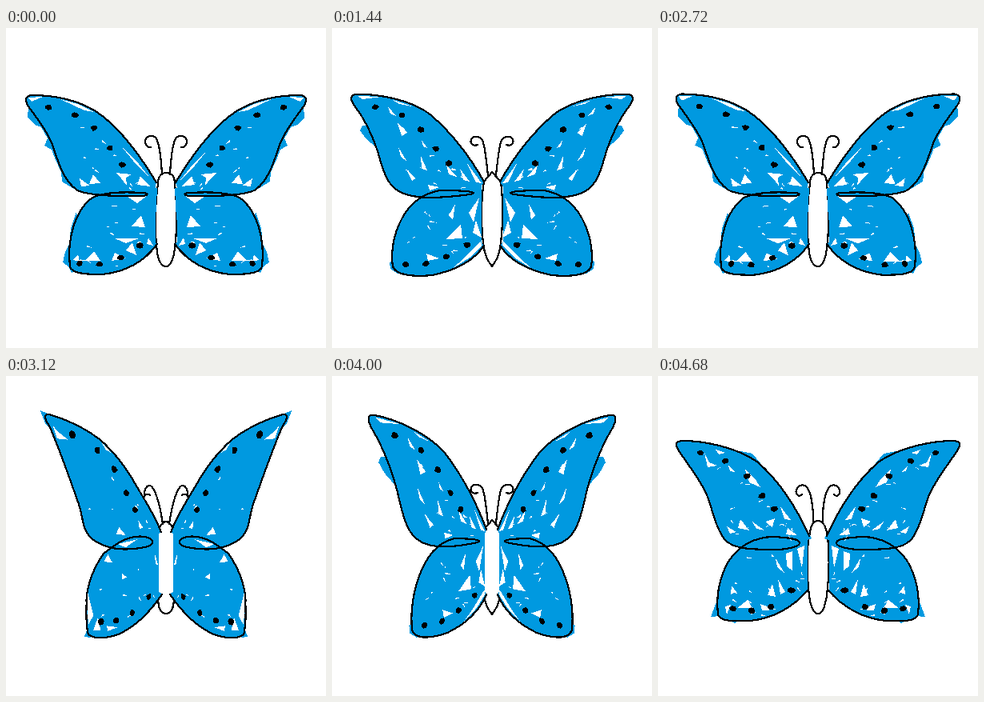
An HTML page for the animation above (4.8 s loop, 400 by 400 pixels).

```html
<!DOCTYPE html>
<html lang="en">
<head>
<meta charset="utf-8">
<title>Butterfly</title>
<style>
  html, body { margin: 0; width: 100%; height: 100%; overflow: hidden; background: #fff; }
  svg { display: block; width: 100vw; height: 100vh; }
  path { shape-rendering: crispEdges; fill: none; }
  .line { stroke: #000; stroke-width: 2.2; stroke-linecap: round; stroke-linejoin: round; }
  .ink { fill: #0099e0; }
  .gap { fill: #fff; }
  .spot { fill: #000; }
</style>
</head>
<body>
<svg id="stage" viewBox="0 0 400 400"></svg>
<script>
const LOOP = 4800, CAMERA = 555.56;

// Four hand drawn versions of the left half; the right half is its mirror.
// "over" is the colouring that runs past the outline.
const drawings = [
  {
    body: 'M190,195 C190,186 194,181 200,181 C207,181 211,186 211,195 C214,220 214,262 210,282 C208,292 205,298 200,298 C194,298 190,290 189,280 C186,258 186,220 190,195Z',
    feeler: 'M195,183 C194,165 192,143 187,137 C182,132 173,136 174,143 C175,147 178,150 181,149',
    line: 'M188,193 C168,160 140,122 112,104 C86,88 55,84 32,84 C24,85 23,90 28,98 C40,114 53,132 58,146 C66,170 72,190 88,202 C100,210 150,211 170,210 C180,209 178,206 168,206 C140,204 118,207 108,212 C86,228 76,265 80,298 C82,308 105,308 120,308 C150,305 173,292 189,270',
    over: 'M28,98 L27,112 L36,121 L44,124 L52,138 L48,147 L57,152 L62,165 L69,180 L70,192 L80,198 L88,203 L100,190 L60,120Z M88,230 L81,250 L79,270 L74,280 L71,293 L78,298 L82,306 L100,290Z M178,200 L189,200 L187,240 L178,240Z',
    gap: 'M28,87 L46,86 L32,92Z M68,89 L90,95 L110,105 L98,103Z M146,150 L166,170 L182,190 L164,172Z M137,181 L157,183 L150,187 L151,197 L144,188Z M92,188 L105,197 L94,198Z M109,183 L118,194 L104,195Z M168,185 L180,198 L164,196Z M152,211 L176,210 L164,219Z M157,248 L169,234 L174,249Z M136,263 L166,263 L150,269Z M110,279 L118,291 L99,291Z M136,281 L150,288 L132,291Z M158,268 L163,284 L150,278Z M90,283 L92,292 L84,290Z M178,262 L184,272 L176,270Z',
    spots: [53,99, 86,109, 110,125, 130,150, 145,171, 92,294, 117,295, 143,287, 168,272],
    specks: 24
  },
  {
    body: 'M190,196 C191,186 195,181 200,181 C206,181 209,186 211,196 C215,215 214,250 211,275 C208,290 206,297 200,297 C194,297 191,289 189,275 C186,250 185,215 190,196Z',
    feeler: 'M194,184 C195,165 191,143 185,138 C178,133 171,141 173,147 C175,151 179,150 180,148',
    line: 'M189,200 C172,162 150,130 125,108 C100,90 60,81 30,81 C21,82 21,86 27,95 C42,117 60,140 65,160 C71,180 76,196 84,205 C95,217 120,217 150,217 C165,216 178,213 177,208 C176,203 160,202 145,201 C120,201 100,213 88,232 C75,255 73,280 75,298 C77,307 95,307 115,306 C145,303 168,290 188,267',
    over: 'M90,92 L103,94 L118,97 L133,115 L110,112Z M184,188 L192,203 L180,208Z M80,272 L72,285 L66,301 L78,300 L96,309 L110,300Z',
    gap: 'M58,96 L64,108 L74,112 L62,114Z M109,117 L121,128 L128,139 L114,133Z M72,92 L84,96 L76,98Z M88,112 L96,120 L90,119Z M103,179 L114,193 L100,190Z M118,182 L133,193 L123,191Z M134,182 L146,178 L143,189Z M153,163 L166,180 L158,179Z M86,188 L98,195 L90,197Z M162,190 L174,199 L160,198Z M160,222 L168,219 L168,243 L161,238Z M147,228 L158,246 L149,239Z M174,216 L183,212 L180,240Z M137,274 L143,260 L147,276Z M150,254 L159,270 L153,273Z M112,280 L118,290 L99,290Z M84,288 L91,286 L86,298Z M128,285 L148,292 L130,293Z M92,262 L98,270 L91,273Z',
    spots: [53,96, 84,106, 111,125, 130,150, 146,166, 94,291, 117,293, 141,288, 167,268],
    specks: 30
  },
  {
    body: 'M190,192 C194,187 197,184 200,180 C203,184 207,187 211,192 C214,215 214,250 210,276 C208,286 204,293 200,298 C196,293 192,286 190,276 C186,250 186,215 190,192Z',
    feeler: 'M195,184 C193,165 191,150 189,143 C186,134 177,134 174,139 C172,145 177,148 182,146',
    line: 'M190,192 C172,160 150,132 125,110 C100,89 55,82 30,83 C22,84 23,90 28,97 C42,115 50,133 57,154 C63,175 68,195 82,203 C95,212 120,213 145,211 C165,209 178,208 177,206 C172,203 150,203 135,203 C112,207 95,220 84,245 C75,265 74,285 76,298 C80,310 105,311 125,309 C155,303 178,290 190,272',
    over: 'M44,122 L38,122 L35,128 L42,138 L56,150 L66,160 L74,190 L82,202 L90,170 L60,130Z M80,285 L72,293 L73,301 L82,307 L95,300Z',
    gap: 'M32,85 L62,86 L38,89Z M76,90 L100,98 L84,95Z M168,168 L187,194 L180,193Z M150,301 L172,287 L187,272 L186,266 L166,287Z M82,119 L94,131 L87,135Z M70,98 L80,110 L73,107Z M111,160 L119,178 L112,176Z M83,149 L93,166 L86,161Z M93,177 L105,188 L100,191Z M143,171 L156,186 L146,183Z M160,176 L172,192 L164,190Z M112,140 L119,150 L114,148Z M120,196 L134,199 L122,203Z M184,212 L177,243 L171,231Z M161,246 L163,263 L142,264Z M180,240 L187,262 L176,256Z M146,234 L154,220 L151,240Z M118,282 L134,288 L120,291Z',
    spots: [54,99, 87,109, 111,127, 130,151, 146,169, 92,295, 117,295, 143,286, 169,271],
    specks: 22
  },
  {
    body: 'M190,196 C192,188 195,182 200,182 C205,182 208,188 210,196 C213,215 213,250 210,276 C210,290 207,297 200,297 C193,297 190,290 190,276 C187,250 187,215 190,196Z',
    feeler: 'M196,185 C193,165 188,145 182,138 C176,134 172,143 173,151 M173,150 C175,147 178,147 180,149',
    line: 'M191,195 C180,175 165,160 151,144 C138,128 125,115 109,105 C90,90 55,83 32,82 C25,83 27,87 32,93 C42,110 55,140 67,167 C72,180 72,190 77,196 C85,208 110,215 133,215 C160,215 178,212 176,207 C172,200 155,200 145,201 C125,204 112,212 100,219 C80,240 76,262 77,270 C76,285 77,295 79,303 C90,312 110,311 121,310 C150,305 172,291 193,272',
    over: 'M22,80 L34,82 L40,100 L28,92Z M80,294 L74,305 L82,307 L95,300Z',
    gap: 'M36,92 L42,97 L54,103 L41,104Z M96,98 L112,109 L103,106Z M78,258 L86,284 L79,294Z M120,209 L150,204 L132,213Z M92,287 L96,302 L86,300Z M122,190 L132,199 L118,198Z M152,182 L160,190 L154,192Z M126,242 L134,247 L127,249Z M104,298 L120,302 L106,304Z M106,220 L112,229 L100,228Z M180,222 L186,236 L181,234Z',
    spots: [59,97, 91,108, 115,126, 133,151, 147,170, 96,292, 118,294, 142,289, 169,273],
    specks: 16
  }
];

function seeded(seed) {
  return () => (seed = (seed * 16807) % 2147483647) / 2147483647;
}

const pt = (x, y) => x.toFixed(1) + ',' + y.toFixed(1);

// Small slivers left white by the scribbled colouring.
function speckPath(count, rnd) {
  let d = '';
  for (let i = 0; i < count; i++) {
    const upper = i % 2, x = upper ? 66 + rnd() * 108 : 90 + rnd() * 90;
    const top = upper ? 108 + (x - 70) ** 2 / 125 : 216 + Math.max(0, 110 - x) * 1.2;
    const low = upper ? Math.min(200, 150 + (x - 60) * 1.5) : 298 - Math.max(0, x - 145) * .8;
    const y = top + rnd() * (low - top), a = rnd() * 1.6 - .4, n = 3 + rnd() * 6;
    d += `M${pt(x, y)} L${pt(x + n * Math.cos(a), y + n * Math.sin(a))} L${pt(x - 1, y + 1.8)}Z `;
  }
  return d;
}

function spotPath(list, rnd) {
  let d = '';
  for (let i = 0; i < list.length; i += 2) {
    for (let k = 0; k < 7; k++) {
      const a = k / 7 * 2 * Math.PI, r = 3.5 + rnd() * 1.8;
      d += (k ? ' L' : 'M') + pt(list[i] + r * Math.cos(a), list[i + 1] + r * .85 * Math.sin(a));
    }
    d += 'Z ';
  }
  return d;
}

drawings.forEach((w, i) => {
  const rnd = seeded(4127 + i * 911);
  w.fill = w.line + ' L186.5,268 L186.5,198Z';
  w.gap += ' ' + speckPath(w.specks, rnd);
  w.spot = spotPath(w.spots, rnd);
});

const stage = document.getElementById('stage');
function addPath(cls) {
  const p = document.createElementNS('http://www.w3.org/2000/svg', 'path');
  p.setAttribute('class', cls);
  return stage.appendChild(p);
}
const layers = { fill: 'ink', over: 'ink', gap: 'gap', spot: 'spot', line: 'line' };
const body = addPath('line');
const wings = [1, -1].map(side => ({
  side, parts: Object.keys(layers).map(key => ({ key, node: addPath(layers[key]) }))
}));

const mapPath = (d, fn) => d.replace(/([\d.]+),([\d.]+)/g, (_, x, y) => pt(...fn(+x, +y)));
const mirror = d => mapPath(d, (x, y) => [400 - x, y]);

// Turns a wing about the body axis, its tip coming towards the camera.
function fold(d, angle, side) {
  const c = Math.cos(angle), s = Math.sin(angle);
  return mapPath(d, (x, y) => {
    const r = 200 - x, k = CAMERA / (CAMERA - r * s);
    return [200 - side * r * c * k, 200 + (y - 200) * k];
  });
}

// The redraw speeds up to one drawing every 40 ms, then rests at the end.
const steps = [0, 120, 240, 320, 440, 520, 600, 720, 840, 920, 1000, 1080, 1160, 1200, 1280];
for (let t = 1360; t <= 4600; t += 40) steps.push(t);
steps.push(4680);

const boil = [[0, 0], [8, 9], [32, 34], [59, 63], [74, 81], [81, 90], [97, 109]];
const flap = [[0, 0], [2640, 0], [3200, 50], [3600, 20], [4140, 53], [4600, 0], [4800, 0]];
const linear = u => u;
const sine = u => (1 - Math.cos(Math.PI * u)) / 2;

function track(keys, at, ease) {
  let i = 1;
  while (i < keys.length - 1 && at >= keys[i][0]) i++;
  const [a, from] = keys[i - 1], [b, to] = keys[i];
  return from + (to - from) * ease((at - a) / (b - a));
}

let shown = -1;
function draw(n) {
  const w = drawings[Math.floor(track(boil, n, linear) + 1e-6) % 4];
  const angle = track(flap, steps[n], sine) * Math.PI / 180;
  body.setAttribute('d', w.body + w.feeler + mirror(w.feeler));
  for (const { side, parts } of wings)
    for (const { key, node } of parts) node.setAttribute('d', fold(w[key], angle, side));
}

const start = performance.now();
function tick(now) {
  const t = Math.max(0, now - start) % LOOP;
  let n = steps.length - 1;
  while (steps[n] > t) n--;
  if (n !== shown) draw(shown = n);
  requestAnimationFrame(tick);
}
tick(start);
</script>
</body>
</html>
```
